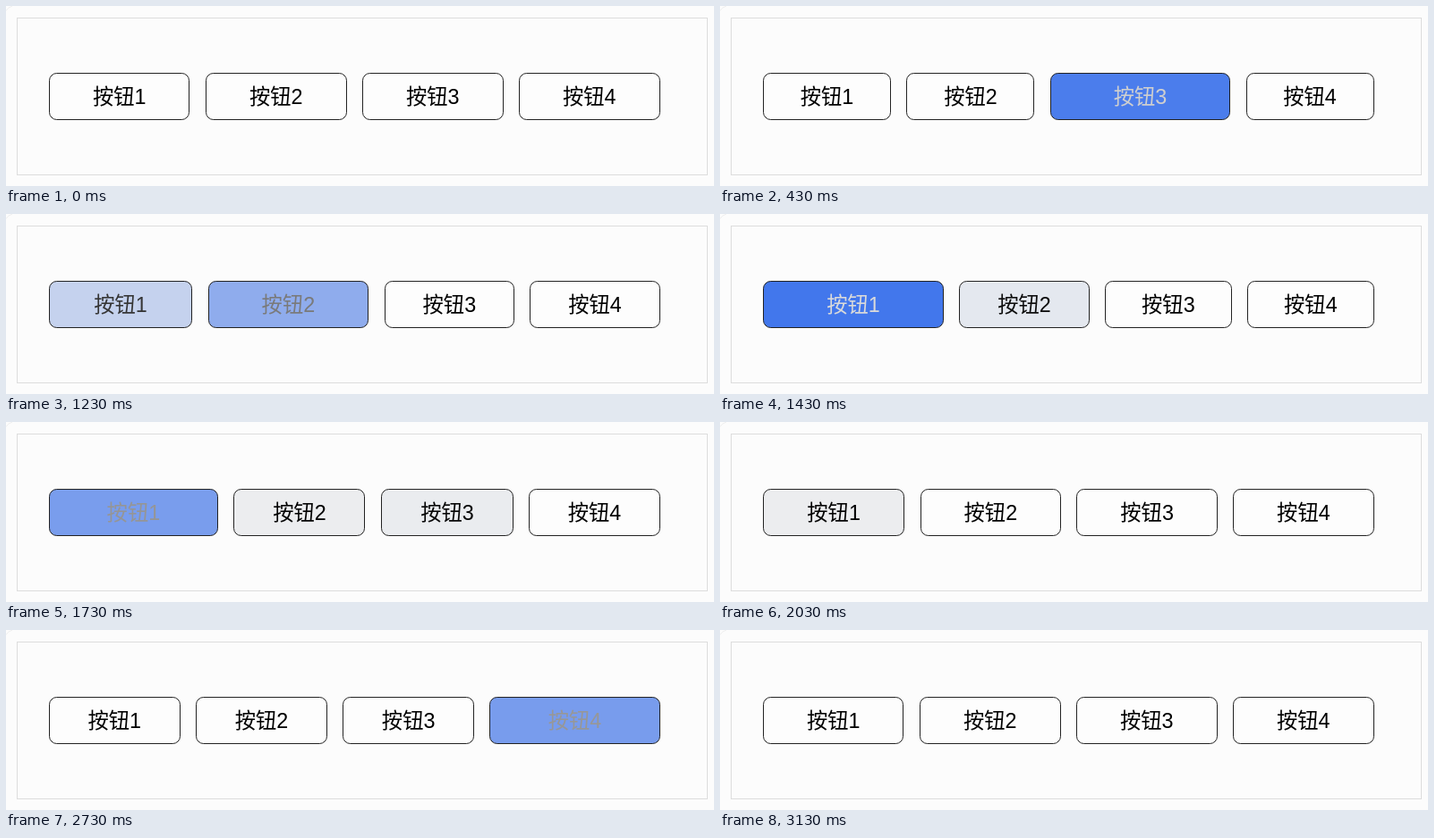
An HTML page that plays this animation: 791 px wide and 202 px high, repeating every 3.93 s.

```html
<!DOCTYPE html>
<html lang="zh-CN">
<head>
<meta charset="utf-8">
<title>按钮</title>
<style>
  html, body { margin: 0; width: 100%; height: 100%; overflow: hidden; background: #fcfcfc; }
  svg { display: block; }
  text { font: 23.33px "Liberation Sans", Arial, "Noto Sans CJK SC", "Noto Sans CJK", sans-serif; text-anchor: middle; }
</style>
</head>
<body>
<svg id="stage" width="791" height="202" viewBox="0 0 791 202">
  <rect width="791" height="202" fill="#fcfcfc"/>
  <path d="M0 5.5Q2 1.5 7 0" fill="none" stroke="#eee"/>
  <rect x="12.5" y="13.5" width="771" height="176" fill="none" stroke="#ddd"/>
</svg>
<script>
const LOOP = 3930, FADE = 500, START = 230, STEP = 100, LAST = 3130;
const LEFT = 47.95, TOTAL = 682.6, GAP = 17.5;
const IDLE = [239, 239, 239], HOVER = [37, 99, 235];

// Pointer enter and leave times per button, in ms.
const hovers = [
  [[1150, 1605]],
  [[705, 1087], [1630, 1690]],
  [[175, 670], [1710, 1760]],
  [[2090, 2605]]
];

// cubic-bezier(.25, .1, .25, 1)
function ease(x) {
  if (x <= 0) return 0;
  if (x >= 1) return 1;
  const curve = (a, b, u) => 3 * a * u * (1 - u) ** 2 + 3 * b * u * u * (1 - u) + u ** 3;
  let lo = 0, hi = 1;
  for (let i = 0; i < 30; i++) {
    const mid = (lo + hi) / 2;
    if (curve(.25, .25, mid) < x) lo = mid; else hi = mid;
  }
  return curve(.1, 1, lo);
}

// A fade that is cut short reverses in proportionally less time.
function level(spans, t) {
  let p = 0;
  for (const [enter, leave] of spans) {
    if (t < enter) continue;
    if (t < leave) p = ease((t - enter) / FADE);
    else {
      const peak = ease((leave - enter) / FADE);
      p = peak * (1 - ease((t - leave) / (FADE * peak)));
    }
  }
  return p;
}

const stage = document.getElementById("stage");
function add(tag, attrs) {
  const el = document.createElementNS("http://www.w3.org/2000/svg", tag);
  set(el, attrs);
  return stage.appendChild(el);
}
function set(el, attrs) {
  for (const k in attrs) el.setAttribute(k, attrs[k]);
}

const buttons = hovers.map((spans, i) => {
  const box = add("rect", { y: 75.5, height: 52, rx: 8.25, stroke: "#222" });
  const label = add("text", { y: 110 });
  label.textContent = "按钮" + (i + 1);
  return { spans, box, label };
});

function draw(time) {
  const t = time < START ? 0
    : Math.min(LAST, START + Math.floor((time - START) / STEP) * STEP);
  const levels = buttons.map(b => level(b.spans, t));
  const unit = (TOTAL - 3 * GAP) / levels.reduce((sum, p) => sum + 1 + p / 2, 0);
  let x = LEFT;
  buttons.forEach(({ box, label }, i) => {
    const p = levels[i], w = unit * (1 + p / 2);
    const x0 = Math.round(x), x1 = Math.round(x + w);
    const mix = IDLE.map((c, k) => Math.round(c + (HOVER[k] - c) * p));
    const ink = Math.round(255 * p);
    set(box, { x: x0 + .5, width: x1 - x0 - 1, fill: p > .004 ? `rgb(${mix})` : "#fdfdfd" });
    set(label, { x: (x + w / 2).toFixed(2), fill: `rgb(${ink},${ink},${ink})` });
    x += w + GAP;
  });
}

const begin = performance.now();
function tick() {
  draw((performance.now() - begin) % LOOP);
  requestAnimationFrame(tick);
}
draw(0);
requestAnimationFrame(tick);
</script>
</body>
</html>
```
